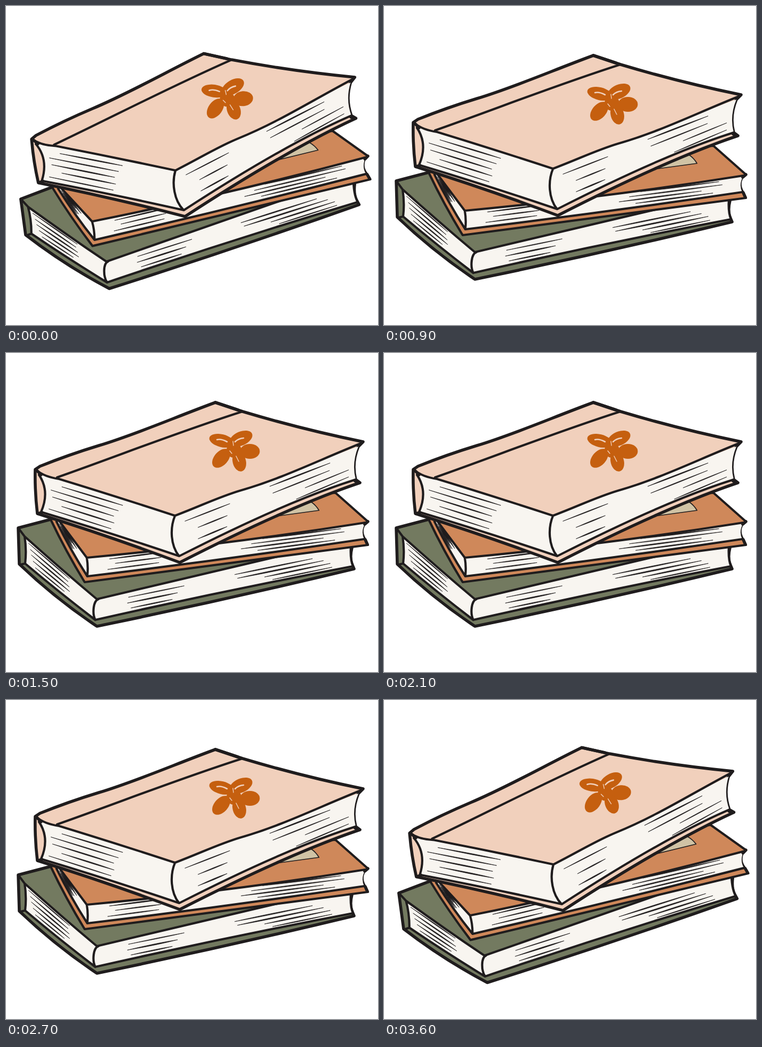
An HTML page for the animation above (3900 ms loop, 700 by 600 pixels).

```html
<!DOCTYPE html>
<html lang="en">
<head>
<meta charset="utf-8">
<title>Stack of books</title>
<style>
html, body { margin: 0; width: 100%; height: 100%; overflow: hidden; background: #fff; }
svg { display: block; width: 700px; height: 600px; }
.ink { fill: none; stroke: #1f1c1d; stroke-width: 4.2; stroke-linecap: round; stroke-linejoin: round; }
.edge { stroke-width: 5.6; }
.fine { stroke-width: 1.6; }
.hatch { fill: #1f1c1d; stroke: #1f1c1d; stroke-width: .7; stroke-linejoin: round; }
.page { fill: #f8f5f0; }
.green { fill: #737a60; }
.orange { fill: #cf885a; }
.pink { fill: #f1d0bc; }
.tan { fill: #d0c3a5; }
.slit { fill: none; stroke: #f1d0bc; stroke-linecap: round; }
</style>
</head>
<body>
<svg viewBox="0 0 700 600">
<g id="stack">
  <g id="bottom">
    <path class="green ink edge" d="M23 329L84 313L400 300L651 366Q646 386 652 399L655 406Q410 465 171 514Q92 461 25 397Z"/>
    <path class="page" d="M35 345Q103 406 171 463L650 350Q646 386 653 401Q410 447 168 502L36 396Q39 370 35 345Z"/>
    <path class="ink" d="M23 329L35 345Q103 406 171 463L650 350Q646 386 653 401Q410 447 168 502Q100 450 36 396Q39 370 35 345M36 396L27 398M174 463C164 466 162 490 168 502"/>
  </g>
  <g id="middle">
    <path class="orange ink" d="M84 313L200 270L620 263L681 317L674 323Q667 336 675 349L681 361Q410 397 148 431Q112 372 84 313Z"/>
    <path class="page" d="M101 317L152 385Q410 361 676 320Q667 336 674 350Q410 389 153 420L95 317Z"/>
    <path class="ink" d="M101 317L152 385Q410 361 676 319M95 317Q121 370 153 420Q410 389 674 350M152 385Q155 402 153 419"/>
    <path class="ink edge" d="M675 322L681 317M676 351L680 360"/>
    <path class="tan ink fine" d="M508 307L574 280Q583 286 589 296Z"/>
  </g>
  <g id="top">
    <path class="pink ink edge" d="M55 219L64 213Q119 191 175 174C245 153 320 120 394 93L445 110Q555 143 672 167L663 176Q650 207 658 238L666 244Q530 290 327 394Q190 343 59 302Q54 260 55 219Z"/>
    <path class="page" d="M62 229L100 237Q208 270 318 306C368 287 400 271 440 259C520 236 585 203 663 176Q650 207 658 238Q530 278 326 382Q190 336 66 299Q83 260 62 229Z"/>
    <path class="ink" d="M57 220Q72 233 100 237Q208 270 318 306C368 287 400 271 440 259C520 236 585 203 670 169M96 234C210 194 320 150 445 110M62 229Q83 260 66 299Q190 336 326 382Q530 278 658 238M318 306C308 330 310 362 325 381"/>
    <path class="ink edge" d="M57 220L66 229M60 302L68 300M394 93L436 107M657 241L665 244"/>
    <g fill="#c55f0f">
      <ellipse cx="406" cy="165" rx="24" ry="12" transform="rotate(14 406 165)"/>
      <ellipse cx="442" cy="161" rx="23" ry="13" transform="rotate(-24 442 161)"/>
      <ellipse cx="459" cy="185" rx="18.5" ry="14"/>
      <ellipse cx="439" cy="204" rx="19" ry="12.5" transform="rotate(76 439 204)"/>
      <ellipse cx="405" cy="198" rx="21" ry="13" transform="rotate(-48 405 198)"/>
      <circle cx="429" cy="183" r="14"/>
    </g>
    <path class="slit" stroke-width="2.6" d="M397 163Q405 161 416 167M431 167Q437 161 447 160"/>
    <path class="slit" stroke-width="1.4" d="M428 174L427 166M433 194L438 204M421 184L425 189"/>
  </g>
</g>
</svg>
<script>
let seed = 7;
const random = () => (seed = seed * 16807 % 2147483647) / 2147483647;
const mix = (p, q, t) => p.map((v, i) => v + (q[i] - v) * t);

// A stroke that swells in the middle and is pointed at both ends
function taper([x1, y1], [x2, y2], width) {
  const k = width / Math.hypot(x2 - x1, y2 - y1) / 1.6;
  const [mx, my] = mix([x1, y1], [x2, y2], .6);
  const nx = (y1 - y2) * k, ny = (x2 - x1) * k;
  return `M${x1} ${y1}Q${mx + nx} ${my + ny} ${x2} ${y2}Q${mx - nx} ${my - ny} ${x1} ${y1}Z`;
}

// Rows of strokes that start near edge a-d of the face a-b-e-d
function rows(a, b, d, e, count, reach) {
  let path = "";
  for (let i = 0; i < count; i++) {
    const v = (i + .8) / (count + .6);
    const u = .04 + .12 * random();
    const end = u + reach * (.6 + .4 * random());
    const from = mix(a, d, v), to = mix(b, e, v);
    path += taper(mix(from, to, u), mix(from, to, end), 2 + 1.5 * random());
  }
  return path;
}

// Corners of both page faces: top edge a-b-c, bottom edge d-e-f
function hatch(id, [a, b, c], [d, e, f]) {
  const path = document.createElementNS("http://www.w3.org/2000/svg", "path");
  path.setAttribute("class", "hatch");
  path.setAttribute("d", rows(a, b, d, e, 5, .6) + rows(b, c, e, f, 3, .25) + rows(c, b, f, e, 4, .35));
  document.getElementById(id).append(path);
}

hatch("bottom", [[37, 346], [171, 463], [648, 366]], [[37, 396], [168, 502], [653, 401]]);
hatch("middle", [[101, 317], [152, 385], [672, 320]], [[95, 317], [153, 420], [672, 350]]);
hatch("top", [[66, 230], [318, 306], [660, 177]], [[68, 299], [326, 382], [658, 238]]);

const stack = document.getElementById("stack");
const tilts = [-6, 0, 6, 0], hold = 300, loop = 3900;
const start = performance.now();

function draw(now) {
  const t = Math.max(0, now - start) % loop;
  const tilt = tilts[Math.floor(t / hold) % tilts.length];
  stack.setAttribute("transform", `rotate(${tilt} 350 300)`);
  requestAnimationFrame(draw);
}
draw(start);
</script>
</body>
</html>
```
